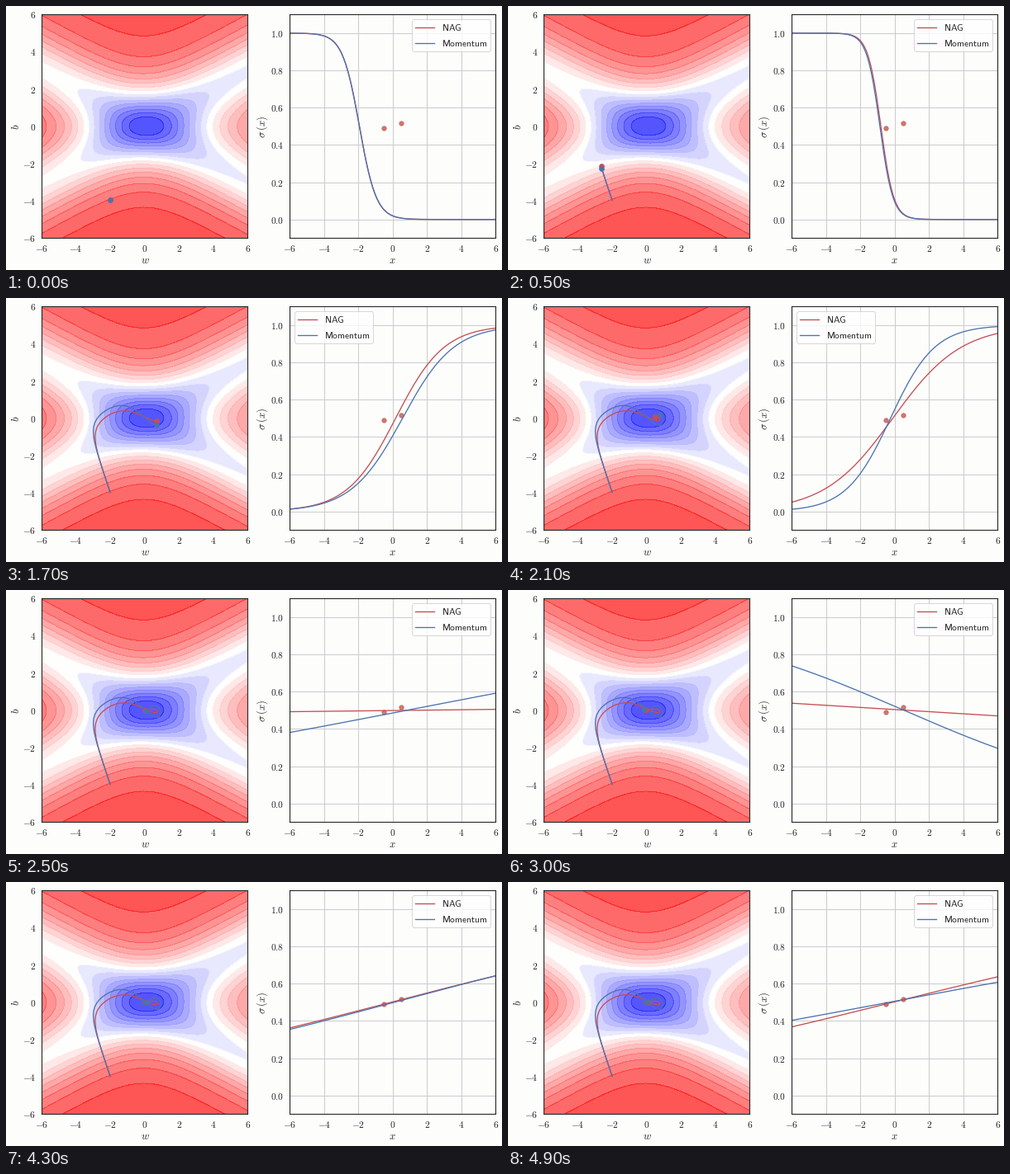
These frames come from a looping animation (600 px wide and 320 px high, 5 s). A matplotlib script:

```python
import numpy as np
import matplotlib.pyplot as plt
from matplotlib.animation import FuncAnimation

WIDTH, HEIGHT, DPI = 600, 320, 100
FRAMES, INTERVAL, STEPS_PER_FRAME = 50, 100, 2
START, ETA, GAMMA = (-2.0, -4.0), 1.0, 0.9
X, Y = np.array([-0.5, 0.5]), np.array([0.49, 0.515])
RED, BLUE = "#c44e52", "#4c72b0"
INK, PAPER = "#262626", "#fdfefc"

plt.rcParams.update({
    "mathtext.fontset": "cm",
    "font.family": "DejaVu Sans",
    "text.color": INK,
    "axes.edgecolor": INK,
    "axes.linewidth": 0.8,
    "axes.axisbelow": True,
})


def sigmoid(z):
    return 1 / (1 + np.exp(-z))


def loss(w, b):
    return sum(0.5 * (sigmoid(w * x + b) - y) ** 2 for x, y in zip(X, Y))


def gradient(params):
    s = sigmoid(params[0] * X + params[1])
    delta = (s - Y) * s * (1 - s)
    return np.array([(delta * X).sum(), delta.sum()])


def descend(look_ahead):
    """Return the (w, b) path of momentum descent, optionally Nesterov's."""
    params, velocity = np.array(START), np.zeros(2)
    path = []
    for _ in range(FRAMES * STEPS_PER_FRAME):
        probe = params - GAMMA * velocity if look_ahead else params
        velocity = GAMMA * velocity + ETA * gradient(probe)
        params = params - velocity
        path.append(params)
    return np.array(path)


fig = plt.figure(figsize=(WIDTH / DPI, HEIGHT / DPI), dpi=DPI, facecolor=PAPER)


def add_axes(left, right, top=10.3, bottom=281.3):
    return fig.add_axes([left / WIDTH, 1 - bottom / HEIGHT,
                         (right - left) / WIDTH, (bottom - top) / HEIGHT],
                        facecolor=PAPER)


def add_label(x, y, text, rotation=0):
    fig.text(x / WIDTH, 1 - y / HEIGHT, text, fontsize=9.2, rotation=rotation,
             ha="center", va="center")


def style(ax, yticks, yformat):
    xticks = range(-6, 7, 2)
    ax.set_xticks(xticks, [f"${v}$" for v in xticks])
    ax.set_yticks(yticks, [f"${v:{yformat}}$" for v in yticks])
    ax.tick_params(length=0, pad=5, labelsize=8.2, labelcolor=INK)


# Loss surface
plane = add_axes(43, 292.4)
grid = np.linspace(-6, 6, 241)
W, B = np.meshgrid(grid, grid)
surface = loss(W, B)
levels = np.arange(18) * 0.015
plane.contourf(W, B, surface, levels, cmap="bwr", alpha=0.7)
plane.contour(W, B, surface, levels[1:-1], cmap="bwr", alpha=0.4,
              linewidths=0.45, vmin=levels[0], vmax=levels[-1])
plane.set(xlim=(-6, 6), ylim=(-6, 6))
style(plane, range(-6, 7, 2), "d")
add_label(168, 308.5, "$w$")
add_label(12.5, 146, "$b$", 90)

# Fitted curves
fit = add_axes(343.3, 592.3)
fit.set(xlim=(-6, 6), ylim=(-0.1, 1.1))
style(fit, np.arange(6) / 5, ".1f")
fit.grid(color="0.8", linewidth=0.75)
fit.scatter(X, Y, s=15, color="#d8746a", edgecolors="#b5645c", linewidths=0.5)
add_label(467, 308.5, "$x$")
add_label(310.5, 146, r"$\sigma\,(x)$", 90)

xs = np.linspace(-6, 6, 200)
runs = []
for name, color, look_ahead in (("NAG", RED, True), ("Momentum", BLUE, False)):
    trail, = plane.plot([], [], color=color, lw=0.95)
    head, = plane.plot([], [], "o", color=color, ms=4.2, mew=0.5, zorder=3)
    curve, = fit.plot(xs, sigmoid(xs), color=color, lw=0.95,
                      label=rf"$\mathsf{{{name}}}$")
    runs.append((descend(look_ahead), trail, head, curve))

legend = fit.legend(loc="best", fontsize=8.2, labelspacing=0.6,
                    borderpad=0.33, borderaxespad=0.52,
                    facecolor="white", edgecolor="0.8", framealpha=0.8)
legend.get_frame().set_linewidth(0.7)


def update(frame):
    count = STEPS_PER_FRAME * (frame + 1)
    artists = []
    for path, trail, head, curve in runs:
        w, b = path[count - 1]
        trail.set_data(*path[:count].T)
        head.set_data([w], [b])
        curve.set_ydata(sigmoid(w * xs + b))
        artists += [trail, head, curve]
    return artists


anim = FuncAnimation(fig, update, frames=FRAMES, interval=INTERVAL,
                     repeat=True, repeat_delay=0)
plt.show()
```
